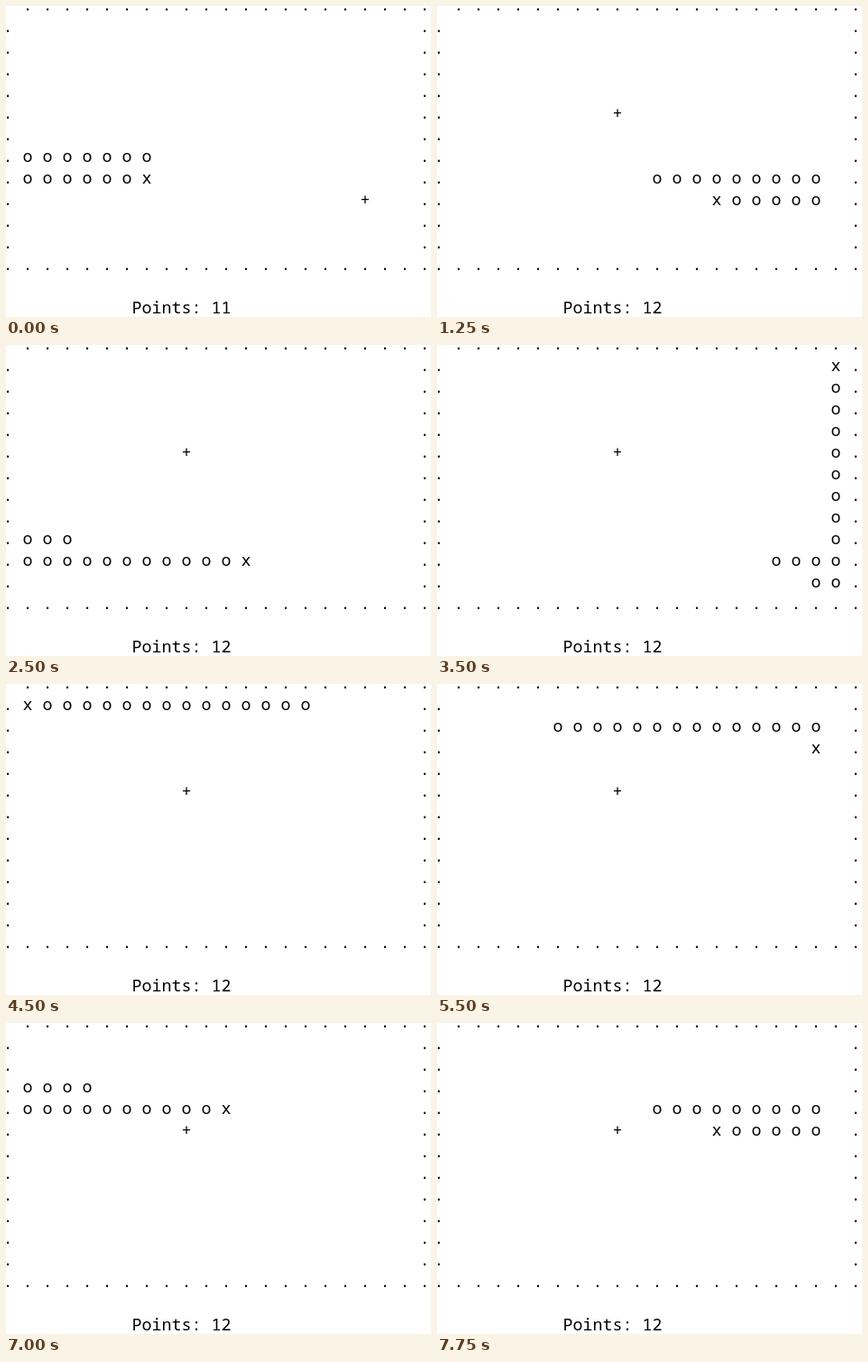
An HTML page that plays this animation: 471 px wide and 345 px high, repeating every 8000 ms.

```html
<!DOCTYPE html>
<html lang="en">
<head>
<meta charset="utf-8">
<title>Snake</title>
<style>
  html, body { margin: 0; width: 100%; height: 100%; overflow: hidden; background: #fff; }
  svg { display: block; width: 471px; height: 345px; }
  text { font: 18.33px "Noto Sans Mono", "DejaVu Sans Mono", monospace; fill: #000; text-anchor: middle; }
  #points { text-anchor: start; white-space: pre; }
</style>
</head>
<body>
<svg viewBox="0 0 471 345">
  <g id="board"></g>
  <text id="points" x="139.5" y="341"></text>
</svg>
<script>
  const LOOP = 8000, TICK = 250;
  const COLS = 21, ROWS = 12;
  const START = 13;      // path index of the head at time 0
  const EAT = 14;        // moves until the food is reached
  const RATE = 4.842;    // moves per screen refresh
  const TURNS = [
    [7, 7], [1, 7], [1, 8], [19, 8], [19, 9], [1, 9], [1, 10], [19, 10], [19, 11], [20, 11],
    [20, 1], [1, 1], [1, 2], [19, 2], [19, 3], [1, 3], [1, 4], [19, 4], [19, 5], [14, 5]
  ];

  const board = document.getElementById('board');
  const points = document.getElementById('points');

  function glyph(char) {
    const el = document.createElementNS('http://www.w3.org/2000/svg', 'text');
    el.textContent = char;
    board.append(el);
    return el;
  }

  function place(el, [col, row]) {
    el.setAttribute('x', 2 + 22 * col);
    el.setAttribute('y', 5 + 24 * row);
  }

  // Every cell the head visits, in order
  const path = [TURNS[0]];
  for (const [col, row] of TURNS.slice(1)) {
    let [c, r] = path[path.length - 1];
    while (c !== col || r !== row) {
      c += Math.sign(col - c);
      r += Math.sign(row - r);
      path.push([c, r]);
    }
  }

  for (let col = 0; col <= COLS; col++) {
    if (col) place(glyph('.'), [col, 0]);
    place(glyph('.'), [col, ROWS]);
  }
  for (let row = 1; row < ROWS; row++) {
    place(glyph('.'), [0, row]);
    place(glyph('.'), [COLS, row]);
  }

  const food = glyph('+');
  const snake = Array.from({ length: 15 }, (_, i) => glyph(i ? 'o' : 'x'));
  let shown = -1;

  function draw(time) {
    const tick = Math.max(0, Math.floor(time / TICK) - 1);
    const moves = Math.max(0, Math.floor(RATE * tick - 0.4));
    if (moves === shown) return;
    shown = moves;

    const eaten = moves >= EAT;
    const head = START + moves;
    const size = eaten ? 15 : 14;
    snake.forEach((el, i) => {
      el.style.display = i < size ? '' : 'none';
      if (i < size) place(el, path[head - i]);
    });
    place(food, eaten ? [9, 5] : [18, 9]);
    points.textContent = 'Points: ' + (eaten ? 12 : 11);
  }

  const begin = performance.now();
  function frame() {
    draw((performance.now() - begin) % LOOP);
    requestAnimationFrame(frame);
  }
  frame();
</script>
</body>
</html>
```
